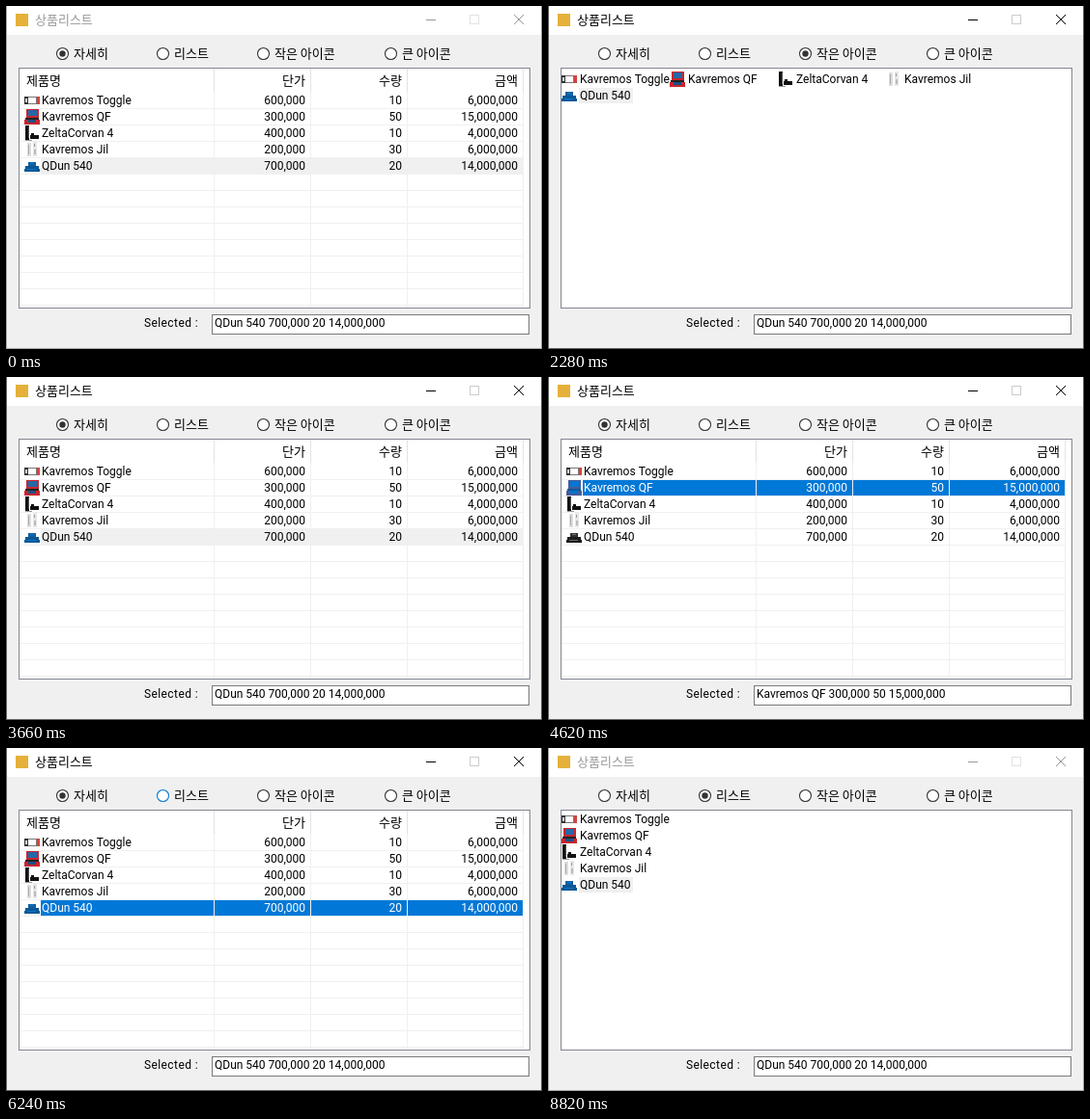
Recreate the animation shown at these times as an HTML page with a canvas. Size 555 by 356 pixels, loop 8.88 s.

```html
<!DOCTYPE html>
<html lang="ko">
<head>
<meta charset="utf-8">
<title>상품리스트</title>
<style>
html, body { margin: 0; width: 100%; height: 100%; overflow: hidden; background: #f0f0f0; }
canvas { display: block; width: 555px; height: 356px; }
</style>
</head>
<body>
<canvas id="stage" width="555" height="356"></canvas>
<script>
const ctx = document.getElementById('stage').getContext('2d');
const LOOP = 8880;
const LATIN = '12px Roboto, "Liberation Sans", sans-serif';
const HANGUL = '13px "Noto Sans CJK KR", "Noto Sans CJK", "Noto Sans", sans-serif';
const BLUE = '#0078d7', FACE = '#f0f0f0', GRID = FACE;

const items = [
  ['Kavremos Toggle', '600,000', '10', '6,000,000'],
  ['Kavremos QF', '300,000', '50', '15,000,000'],
  ['ZeltaCorvan 4', '400,000', '10', '4,000,000'],
  ['Kavremos Jil', '200,000', '30', '6,000,000'],
  ['QDun 540', '700,000', '20', '14,000,000']
];

// Each icon: [colour, x, y, w, h] on a 16 unit square
const icons = [
  [['#333', 0, 4, 4, 8], ['#ddd', 1, 6, 2, 4], ['#777', 4, 4, 9, 8], ['#fff', 4, 5, 8, 6], ['#d8423c', 13, 4, 3, 8]],
  [['#c9252d', 2, 0, 13, 9], ['#2468a8', 4, 1, 9, 6], ['#222', 1, 9, 14, 2], ['#c9252d', 0, 11, 16, 5], ['#1d4f86', 4, 11, 8, 3]],
  [['#111', 1, 0, 4, 15], ['#555', 4, 1, 1, 12], ['#111', 6, 10, 9, 4], ['#111', 7, 8, 3, 2], ['#999', 1, 15, 7, 1]],
  [['#ddd', 3, 1, 4, 14], ['#aaa', 4, 3, 1, 10], ['#e6e6e6', 9, 0, 4, 15], ['#999', 10, 2, 1, 3], ['#bbb', 10, 8, 2, 5]],
  [['#333', 4, 4, 8, 4], ['#777', 6, 5, 4, 1], ['#1c1c1c', 1, 8, 14, 3], ['#1c1c1c', 0, 11, 16, 3], ['#666', 3, 11, 9, 1]]
];

const radios = [[58.5, '자세히'], [162.5, '리스트'], [266.5, '작은 아이콘'], [398.5, '큰 아이콘']];
const views = [drawDetails, drawList, drawSmall, drawLarge];

// Every step changes only the listed parts of the state
const steps = [
  [0, { view: 0, sel: 4, shown: 4, focus: false, active: false, hot: -1, down: -1, header: false }],
  [300, { header: true }],
  [360, { header: false }],
  [720, { hot: 1 }],
  [1140, { active: true, down: 1 }],
  [1200, { view: 1, down: -1 }],
  [1380, { hot: -1 }],
  [1920, { hot: 2 }],
  [2160, { down: 2 }],
  [2220, { view: 2, down: -1 }],
  [2280, { hot: -1 }],
  [2520, { hot: 3 }],
  [2760, { down: 3 }],
  [2880, { view: 3, down: -1 }],
  [3000, { hot: -1 }],
  [3360, { hot: 0 }],
  [3480, { down: 0 }],
  [3600, { view: 0, down: -1 }],
  [3660, { hot: -1 }],
  [3960, { sel: 0, focus: true }],
  [4020, { shown: 0 }],
  [4620, { sel: 1, shown: 1 }],
  [4920, { sel: 2, shown: 2 }],
  [5520, { sel: 3, shown: 3 }],
  [5880, { sel: 4, shown: 4 }],
  [6060, { header: true }],
  [6180, { header: false }],
  [6240, { hot: 1 }],
  [6420, { down: 1, focus: false }],
  [6540, { view: 1, down: -1 }],
  [6600, { hot: -1 }],
  [6900, { sel: 2, shown: 2, focus: true }],
  [7440, { sel: -1 }],
  [7920, { sel: 4, shown: 4 }],
  [8820, { active: false, focus: false }]
];

function stateAt(time) {
  return Object.assign({}, ...steps.filter(s => s[0] <= time).map(s => s[1]));
}

function rect(color, x, y, w, h) {
  ctx.fillStyle = color;
  ctx.fillRect(x, y, w, h);
}

function frame(color, x, y, w, h) {
  ctx.strokeStyle = color;
  ctx.lineWidth = 1;
  ctx.strokeRect(x + .5, y + .5, w - 1, h - 1);
}

function line(color, x1, y1, x2, y2) {
  ctx.strokeStyle = color;
  ctx.lineWidth = 1;
  ctx.beginPath();
  ctx.moveTo(x1, y1);
  ctx.lineTo(x2, y2);
  ctx.stroke();
}

function text(str, x, y, color = '#000', align = 'left', font = LATIN) {
  ctx.font = font;
  ctx.fillStyle = color;
  ctx.textAlign = align;
  ctx.fillText(str, x, y);
}

function icon(i, x, y, size, tint) {
  const k = size / 16;
  for (const [color, a, b, w, h] of icons[i]) rect(color, x + a * k, y + b * k, w * k, h * k);
  if (!tint) return;
  ctx.globalAlpha = .65;
  for (const [, a, b, w, h] of icons[i]) rect(BLUE, x + a * k, y + b * k, w * k, h * k);
  ctx.globalAlpha = 1;
}

function inkFor(s, i) {
  return s.sel === i && s.focus ? '#fff' : '#000';
}

function markFor(s) {
  return s.focus ? BLUE : FACE;
}

function drawDetails(s) {
  const edges = [215, 315, 415, 535];
  if (s.header) rect('#d9ebf9', 14, 65, 201, 24);
  text('제품명', 21, 82, '#000', 'left', HANGUL);
  ['단가', '수량', '금액'].forEach((t, i) => text(t, edges[i + 1] - 5, 82, '#000', 'right', HANGUL));
  if (s.sel >= 0) rect(markFor(s), 36, 90 + s.sel * 17, 499, 16);
  for (let y = 106; y < 313; y += 17) rect(GRID, 14, y, 521, 1);
  for (const x of edges) {
    rect('#e3e3e3', x, 65, 1, 24);
    rect(GRID, x, 89, 1, 224);
  }
  items.forEach(([name, ...cells], i) => {
    const y = 90 + i * 17, ink = inkFor(s, i);
    icon(i, 19, y, 16, s.sel === i);
    text(name, 37, y + 12, ink);
    cells.forEach((c, n) => text(c, edges[n + 1] - 5, y + 12, ink, 'right'));
  });
}

function drawLabel(s, i, x, y) {
  ctx.font = LATIN;
  const w = ctx.measureText(items[i][0]).width;
  if (s.sel === i) rect(markFor(s), x + 18, y, Math.round(w) + 3, 16);
  icon(i, x, y, 16, s.sel === i);
  text(items[i][0], x + 19, y + 12, inkFor(s, i));
}

function drawList(s) {
  items.forEach((_, i) => drawLabel(s, i, 14, 66 + i * 17));
}

function drawSmall(s) {
  items.forEach((_, i) => drawLabel(s, i, 14 + i % 4 * 112, 68 + Math.floor(i / 4) * 17));
}

function drawLarge(s) {
  items.forEach(([name], i) => {
    const cx = 60 + i * 91;
    icon(i, cx - 24, 67, 48, s.sel === i);
    ctx.font = LATIN;
    const w = ctx.measureText(name).width;
    if (s.sel === i) rect(markFor(s), Math.round(cx - w / 2 - 2), 119, Math.round(w + 4), 16);
    const rows = w > 85 ? name.split(' ') : [name];
    rows.forEach((t, n) => text(t, cx, 131 + n * 14, inkFor(s, i), 'center'));
  });
}

function drawRadio(s, i) {
  const [x, label] = radios[i];
  const down = s.down === i, hot = s.hot === i;
  const color = down ? '#005499' : hot ? BLUE : '#333';
  ctx.beginPath();
  ctx.arc(x, 49.5, 6, 0, Math.PI * 2);
  ctx.fillStyle = down ? '#cce4f7' : '#fff';
  ctx.fill();
  ctx.strokeStyle = color;
  ctx.lineWidth = 1.1;
  ctx.stroke();
  if (s.view === i) {
    ctx.beginPath();
    ctx.arc(x, 49.5, 3.2, 0, Math.PI * 2);
    ctx.fillStyle = color;
    ctx.fill();
  }
  text(label, x + 11.5, 54, '#000', 'left', HANGUL);
}

function drawWindow(s) {
  const ink = s.active ? '#000' : '#999';
  rect(FACE, 0, 0, 555, 356);
  rect('#fff', 0, 0, 555, 30);
  rect('#e5b13a', 10, 8, 13, 13);
  text('상품리스트', 30, 19, ink, 'left', HANGUL);
  rect(ink, 435, 14, 10, 1);
  frame(s.active ? '#ccc' : '#e2e2e2', 480, 9, 10, 10);
  line(ink, 526, 9, 536, 19);
  line(ink, 536, 9, 526, 19);
  // The top edge of the border lies outside the stage
  frame(s.active ? '#666' : '#aaa', 0, -1, 555, 357);
}

function draw(time) {
  const s = stateAt(time);
  drawWindow(s);
  radios.forEach((_, i) => drawRadio(s, i));
  rect('#fff', 13, 64, 530, 250);
  views[s.view](s);
  frame('#828790', 13, 64, 530, 250);
  ctx.letterSpacing = '0.4px';
  text('Selected :', 143, 333);
  ctx.letterSpacing = '0px';
  rect('#fff', 213, 320, 329, 21);
  frame('#7a7a7a', 213, 320, 329, 21);
  text(items[s.shown].join(' '), 216, 333);
}

const start = performance.now();
function tick() {
  draw((performance.now() - start) % LOOP);
  requestAnimationFrame(tick);
}
tick();
</script>
</body>
</html>
```
